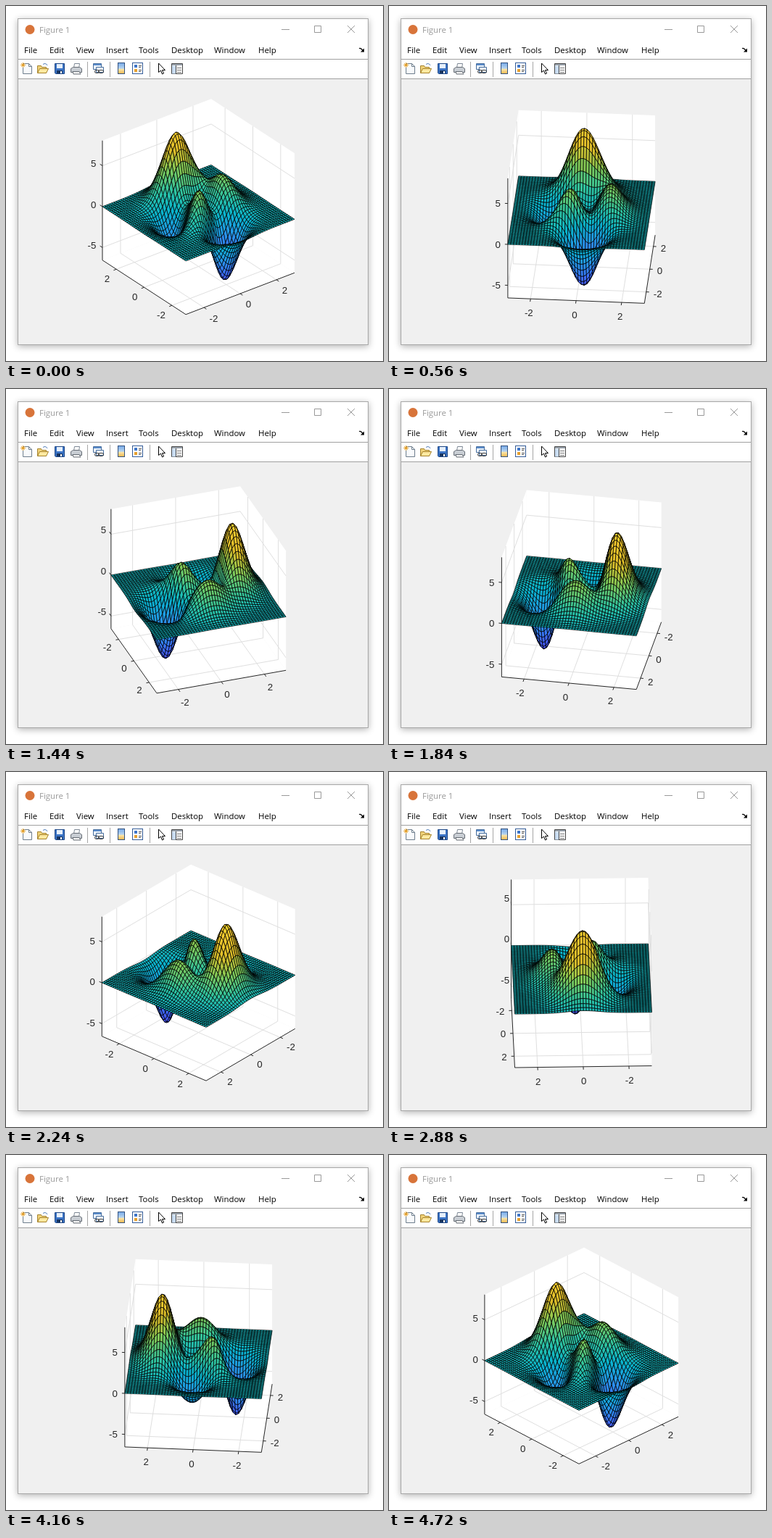
Recreate the animation shown at these times as an HTML page with a canvas. Size 520x490 px, loop 4800 ms.

```html
<!DOCTYPE html>
<html lang="en">
<head>
<meta charset="utf-8">
<title>Figure 1</title>
<style>
  html, body { margin: 0; width: 100%; height: 100%; overflow: hidden; background: #fff; }
  .window {
    position: absolute; left: 16px; top: 17px; width: 482px; height: 449px;
    border: 1px solid #a8a8a8; background: #f0f0f0;
    box-shadow: 0 2px 9px rgba(0, 0, 0, .3);
  }
  svg, canvas { position: absolute; left: 0; top: 0; width: 520px; height: 490px; }
  .ui { font: 11.4px "Open Sans", "Noto Sans", sans-serif; }
</style>
</head>
<body>
<div class="window"></div>
<svg viewBox="0 0 520 490" fill="none">
  <rect x="17" y="18" width="482" height="83" fill="#fff"/>
  <path d="M17 73.5H499M17 100.5H499" stroke="#a0a0a0"/>
  <circle cx="33" cy="32.5" r="6.5" fill="#d8743a"/>
  <g class="ui">
    <text x="46" y="37" fill="#999">Figure 1</text>
    <g fill="#000">
      <text x="25" y="65">File</text><text x="60" y="65">Edit</text>
      <text x="97" y="65">View</text><text x="138" y="65">Insert</text>
      <text x="183" y="65">Tools</text><text x="228" y="65">Desktop</text>
      <text x="287" y="65">Window</text><text x="348" y="65">Help</text>
    </g>
  </g>
  <path d="M380 32.5H391M425.5 27.5h9v9h-9zM471 27l10 10M481 27l-10 10" stroke="#999"/>
  <path d="M487 58.5q3-1 5 3" stroke="#000" stroke-width="1.3"/>
  <path d="M494 58.5v5h-5z" fill="#000"/>
  <path d="M112.5 77V98M143.5 77V98M198.5 77V98" stroke="#a6a6a6"/>

  <!-- new, open -->
  <path d="M23.5 79.5h8l4 4v10h-12z" fill="#f8fafc" stroke="#6d7d8c"/>
  <path d="M31.5 79.5v4h4" stroke="#6d7d8c"/>
  <path d="M20 81.5h7M23.5 78v7M21 79l5 5M26 79l-5 5" stroke="#e3a02c"/>
  <path d="M43.5 92.5v-10h5l1 2h6v8z" fill="#f0d27a" stroke="#a5822b"/>
  <path d="M43.5 92.5l3-6h12l-3 6z" fill="#ffe9a0" stroke="#a5822b"/>
  <path d="M51 80.5q4-2.500 6 1.500" stroke="#4a77b5"/>
  <!-- save, print -->
  <path d="M67.500 79.500h13v14h-12l-1-1z" fill="#3b73c4" stroke="#1e4684"/>
  <path d="M70 80h8v6h-8z" fill="#e6f0fb"/>
  <path d="M70 89h8v4h-8z" fill="#17345f"/>
  <path d="M75 90h2v3h-2z" fill="#fff"/>
  <path d="M93.500 85.500l1-6h7l-1 6" fill="#fff" stroke="#7c8794"/>
  <path d="M89.500 86.500l3-2h9l3 2v5h-15z" fill="#c9ced4" stroke="#666d75"/>
  <path d="M92 90.500h9l2 3.500h-10z" fill="#f2f2f2" stroke="#666d75"/>
  <!-- link -->
  <path d="M120.500 79.500h11v8h-11z" fill="#eef5fc" stroke="#466d9c"/>
  <path d="M121 81h10" stroke="#5b8ccb" stroke-width="2"/>
  <path d="M124.500 84.500h10v7h-10z" fill="#f5f8fb" stroke="#466d9c"/>
  <rect x="122.500" y="88.500" width="6" height="4" rx="2" stroke="#333"/>
  <rect x="127.500" y="88.500" width="7" height="4" rx="2" stroke="#333"/>
  <!-- colour bar, legend -->
  <linearGradient id="bar" x2="0" y2="1">
    <stop stop-color="#76a9e8"/><stop offset=".5" stop-color="#b7d4ee"/>
    <stop offset=".6" stop-color="#fbe3a4"/><stop offset="1" stop-color="#f2b84f"/>
  </linearGradient>
  <rect x="154.500" y="78.500" width="9" height="15" fill="url(#bar)" stroke="#33527f"/>
  <rect x="174.500" y="78.500" width="14" height="15" fill="#fff" stroke="#345c98"/>
  <path d="M177 81h4v4h-4z" fill="#3f76c8"/>
  <path d="M177 87h4v4h-4z" fill="#e8a12e"/>
  <path d="M183 82.500h4M183 84.500h3M183 88.500h4M183 90.500h3" stroke="#555"/>
  <!-- pointer, inspector -->
  <path d="M210.500 79v12.500l3-2.500 2 5 2-1-2-4.500h4z" fill="#fff" stroke="#000"/>
  <path d="M228.500 79.500h15v14h-15z" fill="#fff" stroke="#444"/>
  <path d="M229 81h14" stroke="#9aa3ad" stroke-width="2"/>
  <path d="M229 82.500h5v11h-5z" fill="#c8dcf2"/>
  <path d="M234.500 82v11" stroke="#444"/>
  <path d="M236 85.500h6M236 88.500h6M236 91.500h6" stroke="#777"/>
</svg>
<canvas width="520" height="490"></canvas>

<script>
const ctx = document.querySelector('canvas').getContext('2d');
const STEP = 80, STEPS = 60, START = -37.5;
const CX = 265.5, CY = 277, SCALE = 31.5, ZSCALE = 11.29;
const ZMIN = -6.5466, ZMAX = 8.0752, ZMID = (ZMIN + ZMAX) / 2;
const CMIN = -9, CMAX = 9.8;
const N = 48, INK = '#262626';
const TICKS = [-2, 0, 2], ZTICKS = [-5, 0, 5];

const PARULA = [
  [62, 38, 168], [71, 71, 235], [62, 111, 255], [39, 151, 235], [8, 181, 208],
  [49, 198, 159], [129, 204, 89], [220, 189, 41], [252, 207, 48], [249, 251, 21]
];

function colour(z) {
  const p = (z - CMIN) / (CMAX - CMIN) * (PARULA.length - 1);
  const i = Math.floor(p), f = p - i;
  return `rgb(${PARULA[i].map((c, k) => Math.round(c + (PARULA[i + 1][k] - c) * f))})`;
}

function peaks(x, y) {
  return 3 * (1 - x) ** 2 * Math.exp(-x * x - (y + 1) ** 2)
    - 10 * (x / 5 - x ** 3 - y ** 5) * Math.exp(-x * x - y * y)
    - Math.exp(-((x + 1) ** 2) - y * y) / 3;
}

const coord = i => -3 + 6 * i / N;
const heights = [], colours = [];
for (let i = 0; i <= N; i++) {
  heights.push([]);
  colours.push([]);
  for (let j = 0; j <= N; j++) {
    const z = peaks(coord(i), coord(j));
    heights[i].push(z);
    colours[i].push(colour(z));
  }
}

let sin, cos;

const project = (x, y, z) => [
  CX + SCALE * (x * cos + y * sin),
  CY - SCALE / 2 * (y * cos - x * sin) - ZSCALE * (z - ZMID)
];

function trace(...points) {
  ctx.beginPath();
  points.forEach(p => ctx.lineTo(p[0], p[1]));
}

function line(...points) {
  trace(...points);
  ctx.stroke();
}

function panel(...points) {
  trace(...points);
  ctx.fill();
}

function unit(a, b) {
  const dx = b[0] - a[0], dy = b[1] - a[1], len = Math.hypot(dx, dy);
  return [dx / len, dy / len];
}

function tick(p, [ux, uy]) {
  line(p, [p[0] + 4 * ux, p[1] + 4 * uy]);
}

// Labels along the two floor axes.
function floorTick(value, p, u) {
  tick(p, u);
  const [ux, uy] = u, half = ctx.measureText(value).width / 2;
  ctx.fillText(value,
    p[0] + ux * (10 + half) - half,
    p[1] + 9 * Math.min(1, 5.5 * uy) + 10.5 * uy + 4.7);
}

function zTick(value, p, u) {
  tick(p, u);
  const [ux, uy] = u;
  ctx.fillText(value,
    p[0] - 2 - 8 * Math.abs(ux) - ctx.measureText(value).width,
    p[1] + 9 * uy * Math.abs(uy) + 4.7);
}

function drawAxes() {
  // (fx, fy) is the nearest vertical edge of the box.
  const fx = sin > 0 ? 3 : -3, fy = cos > 0 ? -3 : 3;
  const front = project(fx, fy, ZMIN);
  const xEnd = project(-fx, fy, ZMIN), yEnd = project(fx, -fy, ZMIN);
  const back = project(-fx, -fy, ZMIN);
  const lift = p => [p[0], p[1] - ZSCALE * (ZMAX - ZMIN)];

  ctx.fillStyle = '#fff';
  panel(front, xEnd, back, yEnd);
  panel(xEnd, back, lift(back), lift(xEnd));
  panel(yEnd, back, lift(back), lift(yEnd));

  ctx.lineWidth = 1;
  ctx.strokeStyle = '#dfdfdf';
  for (const t of TICKS) {
    line(project(t, fy, ZMIN), project(t, -fy, ZMIN), project(t, -fy, ZMAX));
    line(project(fx, t, ZMIN), project(-fx, t, ZMIN), project(-fx, t, ZMAX));
  }
  for (const z of ZTICKS) {
    line(project(-fx, fy, z), project(-fx, -fy, z), project(fx, -fy, z));
  }

  ctx.strokeStyle = ctx.fillStyle = INK;
  const onX = xEnd[0] < yEnd[0], left = onX ? xEnd : yEnd;
  line(xEnd, front, yEnd);
  line(left, lift(left));

  const alongX = unit(xEnd, front), alongY = unit(yEnd, front);
  for (const t of TICKS) {
    floorTick(t, project(t, fy, ZMIN), alongY);
    floorTick(t, project(fx, t, ZMIN), alongX);
  }
  const out = unit(front, left);
  for (const z of ZTICKS) {
    zTick(z, onX ? project(-fx, fy, z) : project(fx, -fy, z), out);
  }
}

function drawSurface() {
  const pts = heights.map((row, i) => row.map((z, j) => project(coord(i), coord(j), z)));
  ctx.strokeStyle = '#000';
  ctx.lineWidth = .75;
  // Cells are painted from far to near.
  for (let a = 0; a < N; a++) {
    const i = sin > 0 ? a : N - 1 - a;
    for (let b = 0; b < N; b++) {
      const j = cos > 0 ? N - 1 - b : b;
      trace(pts[i][j], pts[i + 1][j], pts[i + 1][j + 1], pts[i][j + 1]);
      ctx.closePath();
      ctx.fillStyle = colours[i][j];
      ctx.fill();
      ctx.stroke();
    }
  }
}

function draw(step) {
  const az = (START + step * 360 / STEPS) * Math.PI / 180;
  sin = Math.sin(az);
  cos = Math.cos(az);
  ctx.clearRect(0, 0, 520, 490);
  drawAxes();
  drawSurface();
}

ctx.font = '13.3px "Liberation Sans", Arial, sans-serif';
ctx.lineJoin = 'round';
let shown = -1;

function frame() {
  const step = Math.floor(performance.now() / STEP) % STEPS;
  if (step !== shown) draw(shown = step);
  requestAnimationFrame(frame);
}
frame();
</script>
</body>
</html>
```
